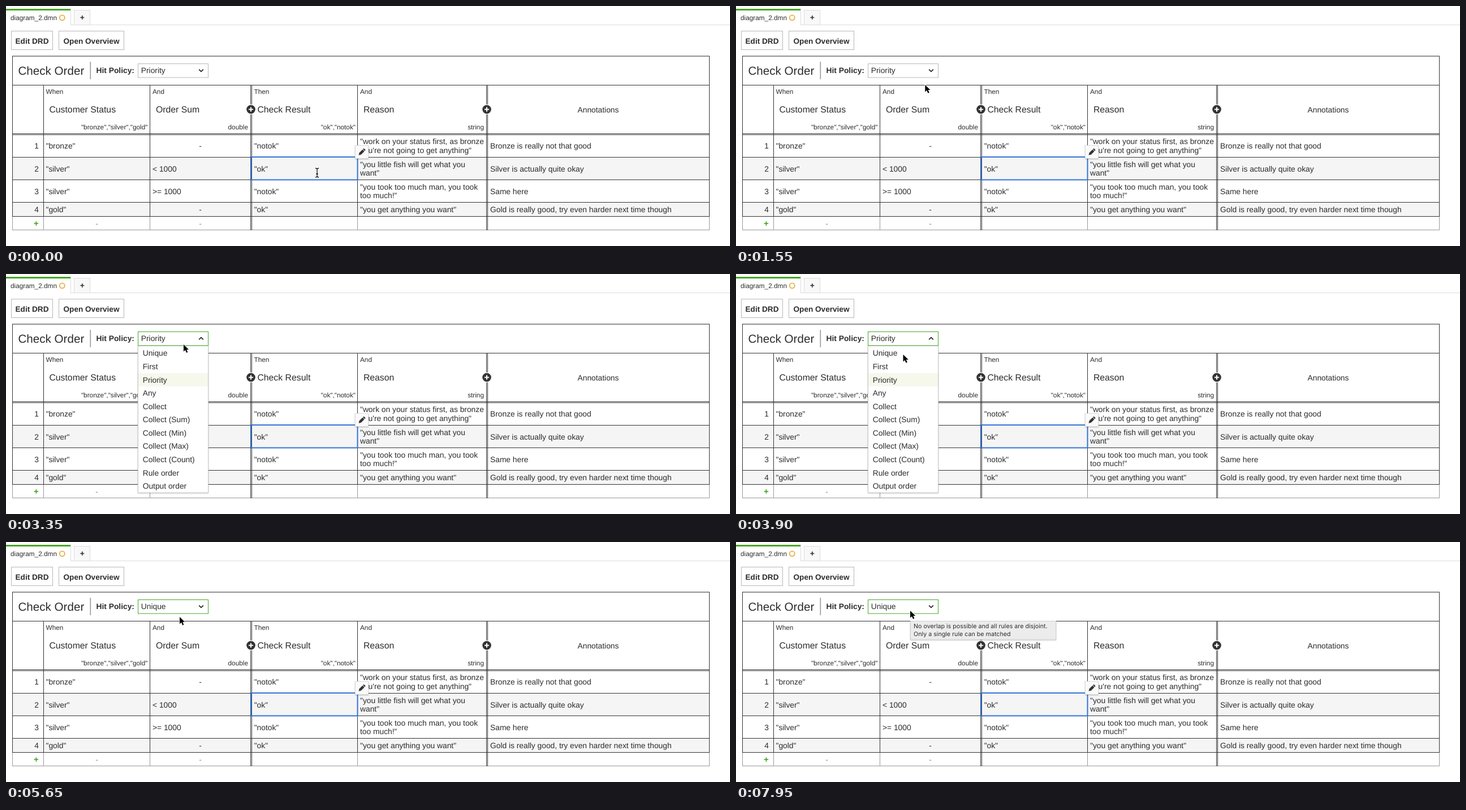
Recreate the animation shown at these times as an HTML page. Size 1280 by 426 pixels, loop 8000 ms.

```html
<!DOCTYPE html>
<html lang="en">
<head>
<meta charset="utf-8">
<title>Decision table</title>
<style>
  html, body { margin: 0; width: 100%; height: 100%; overflow: hidden; background: #fff; }
  svg { display: block; width: 1280px; height: 426px; }
  text { font: 13.8px "Liberation Sans", Arial, sans-serif; fill: #2c2c2c; text-rendering: geometricPrecision; }
  .small { font-size: 11.8px; }
  .name { font-size: 15.8px; }
  .title { font-size: 20.6px; }
  .bold { font-weight: bold; }
  .button { font-weight: bold; font-size: 13.6px; }
  .tip { font: 10.7px Inter, "Open Sans", sans-serif; }
  .faint { fill: #888; }
  .plus { fill: #41a51f; font-weight: bold; font-size: 15px; }
  .end { text-anchor: end; }
  .mid { text-anchor: middle; }
</style>
</head>
<body>
<svg id="stage" viewBox="0 0 1280 426" xmlns="http://www.w3.org/2000/svg"></svg>
<script>
const LOOP = 8000;
const DARK = '#333', GREEN = '#45a824', GREY = '#b8b8b8';

const text = (x, y, s, cls = '') => `<text x="${x}" y="${y}" class="${cls}">${s}</text>`;
const rect = (x, y, w, h, fill, stroke = 'none', extra = '') =>
  `<rect x="${x}" y="${y}" width="${w}" height="${h}" fill="${fill}" stroke="${stroke}" ${extra}/>`;
const path = (d, stroke, extra = '') => `<path d="${d}" fill="none" stroke="${stroke}" ${extra}/>`;
const group = (id, body, extra = '') => `<g id="${id}" ${extra}>${body}</g>`;
const hline = (y, color = DARK) => path(`M11 ${y}H1244`, color);
const vline = (x, y1, y2, color = DARK) => path(`M${x} ${y1}V${y2}`, color);

function toolbar() {
  return path('M114.5 33.5H1280', '#ddd') + rect(0, 5, 114, 3, GREEN) + vline(114.5, 5, 34, '#ddd') +
    text(8, 24.5, 'diagram_2.dmn', 'small') +
    '<circle cx="99.3" cy="20.8" r="4.5" fill="none" stroke="#e3a52c" stroke-width="1.6"/>' +
    rect(120.5, 7.5, 28, 26, '#f8f8f8', '#ddd') + text(134.7, 24.5, '+', 'bold mid') +
    rect(9.5, 44.5, 73, 33, '#fff', GREY) + text(46, 67, 'Edit DRD', 'button mid') +
    rect(93.5, 44.5, 115, 33, '#fff', GREY) + text(151, 67, 'Open Overview', 'button mid');
}

function grid() {
  let s = rect(12, 269, 1231, 39, '#f5f5f6') + rect(12, 349, 1231, 24, '#f5f5f6');
  s += [140.5, 226.5, 228.5, 268.5, 308.5, 348.5, 373.5].map(y => hline(y)).join('');
  s += hline(397.5, '#999') + hline(89, '#222');
  for (const x of [11.5, 66.5, 254.5, 621.5, 1243.5]) {
    const top = x === 11.5 || x === 1243.5 ? 89 : 140;
    s += vline(x, top, 374) + vline(x, 374, 398, '#999');
  }
  return s + [432.5, 434.5, 849.5, 851.5].map(x => vline(x, 140, 398)).join('');
}

function header() {
  const cols = [
    [66, 'When', 'Customer Status', '"bronze","silver","gold"', 250.5],
    [254.5, 'And', 'Order Sum', 'double', 428],
    [434, 'Then', 'Check Result', '"ok","notok"', 618],
    [621.5, 'And', 'Reason', 'string', 845]
  ];
  let s = text(21.5, 121.8, 'Check Order', 'title') + path('M149.3 99V130', '#999', 'stroke-width="1.6"') +
    text(159.5, 119, 'Hit Policy:', 'bold');
  cols.forEach(([x, clause, name, type, right], i) => {
    s += group('clause' + i, text(x + 4.5, 156, clause, 'small')) +
      text(x + 10.4, 188.8, name, 'name') + text(right, 218.7, type, 'small end');
  });
  s += text(1047, 188.5, 'Annotations', 'mid');
  for (const x of [433, 850]) {
    s += `<circle cx="${x}" cy="183.5" r="9" fill="#fff"/><circle cx="${x}" cy="183.5" r="7.8" fill="${DARK}"/>` +
      path(`M${x - 4} 183.5h8M${x} 179.5v8`, '#fff', 'stroke-width="2"');
  }
  let dots = '';
  for (let i = 0; i < 6; i++) dots += rect(262.5 + i % 2 * 5, 146.5 + (i >> 1) * 4.3, 2.7, 2.7, '#888');
  return s + group('handle', dots);
}

function rules() {
  const rows = [
    [253.2, '"bronze"', '-', '"notok"', ['"work on your status first, as bronze', 'you\'re not going to get anything"'], 'Bronze is really not that good'],
    [293.6, '"silver"', '&lt; 1000', '"ok"', ['"you little fish will get what you', 'want"'], 'Silver is actually quite okay'],
    [333.6, '"silver"', '&gt;= 1000', '"notok"', ['"you took too much man, you took', 'too much!"'], 'Same here'],
    [366.3, '"gold"', '-', '"ok"', ['"you get anything you want"'], 'Gold is really good, try even harder next time though']
  ];
  let s = '';
  rows.forEach(([y, status, sum, result, reason, note], i) => {
    s += text(58, y, i + 1, 'end') + text(70.5, y, status) +
      (sum === '-' ? text(343.5, y, sum, 'mid') : text(259, y, sum)) +
      text(438.7, y, result) + text(856, y, note);
    reason.forEach((line, j) => { s += text(626, y + (j - (reason.length - 1) / 2) * 15.7, line); });
  });
  return s + text(53.5, 391, '+', 'plus mid') + text(160.5, 390.5, '-', 'faint mid') + text(343.5, 390.5, '-', 'faint mid');
}

function selection() {
  return rect(433.5, 268, 188, 40.5, 'none', '#3373d8', 'stroke-width="2"') +
    rect(617.5, 247.5, 23, 23, '#fafafa', '#ddd', 'filter="url(#shadow)"') +
    `<g transform="translate(629 259.3) rotate(45)" fill="${DARK}">` +
    '<path d="M-2.3-4.2H2.3V4L0 7.8L-2.3 4Z"/><rect x="-2.3" y="-7.3" width="4.6" height="2.3" rx="1"/></g>';
}

function dropdown() {
  const options = ['Unique', 'First', 'Priority', 'Any', 'Collect', 'Collect (Sum)', 'Collect (Min)',
    'Collect (Max)', 'Collect (Count)', 'Rule order', 'Output order'];
  return rect(233.5, 127.5, 124, 260.5, '#fff', '#ccc', 'filter="url(#shadow)"') +
    rect(234, 176, 123, 23.5, '#f6f8ec') +
    options.map((o, i) => text(241.7, 145.4 + i * 23.58, o)).join('');
}

function tooltip() {
  return rect(308.5, 140.5, 257, 32.5, '#ececec', '#d2d2d2', 'filter="url(#shadow)"') +
    text(314, 153.4, 'No overlap is possible and all rules are disjoint.', 'tip') +
    text(314, 167, 'Only a single rule can be matched', 'tip');
}

function cursors() {
  const beam = 'M-3-8Q0-8 0-6Q0-8 3-8M0-6V6M-3 8Q0 8 0 6Q0 8 3 8M-1.8 2H1.8';
  const arm = 'M-.8 0V-4.6H-3L0-8L3-4.6H.8V0Z';
  const cross = [0, 90, 180, 270].map(a => `<path d="${arm}" transform="rotate(${a})"/>`).join('');
  return group('beam', path(beam, '#fff', 'stroke-width="2.6"') + path(beam, '#111', 'stroke-width="1.3"')) +
    group('move', `<g fill="#fff" stroke="#fff" stroke-width="2">${cross}</g><g fill="#111">${cross}</g>`) +
    group('arrow', '<path d="M0 0V12.6L3 9.9L5.1 14.7L7.4 13.7L5.3 9.1H9.2Z" fill="#000" stroke="#fff" stroke-width="1.6" paint-order="stroke"/>');
}

const stage = document.getElementById('stage');
stage.innerHTML =
  '<defs><filter id="shadow" x="-20%" y="-20%" width="140%" height="150%">' +
  '<feDropShadow dx="0" dy="1" stdDeviation="1.2" flood-color="#000" flood-opacity=".25"/></filter></defs>' +
  toolbar() + grid() + header() + rules() + selection() +
  group('menu', dropdown()) +
  rect(233.5, 102.5, 124, 24.5, '#fff', GREY, 'id="box"') + '<text id="value" x="238.8" y="119"></text>' +
  path('M341.2 112.6L345 116.4L348.8 112.6', '#222', 'id="chevron" stroke-width="1.7"') +
  group('tooltip', tooltip()) + group('cursor', cursors());

const el = id => document.getElementById(id);
const show = (id, on) => { el(id).style.display = on ? '' : 'none'; };

// Pointer track: time, x, y
const track = [
  [0, 550, 296], [400, 550, 296], [600, 534, 285], [800, 484, 252], [900, 448, 229],
  [1000, 404, 199], [1200, 360, 166], [1450, 338, 145], [1750, 327, 130], [1850, 319, 119],
  [2000, 317, 117], [3150, 317, 117], [3350, 314, 125], [3600, 300, 144], [3700, 298, 146],
  [3850, 298, 146], [3900, 295.5, 143], [5000, 295.5, 143], [5650, 307, 133], [5850, 308, 126],
  [6000, 308, 122], [LOOP, 308, 122]
];

function pointer(t) {
  const i = track.findIndex(p => p[0] > t);
  const [t0, x0, y0] = track[i - 1], [t1, x1, y1] = track[i];
  const k = (t - t0) / (t1 - t0);
  return [x0 + (x1 - x0) * k, y0 + (y1 - y0) * k];
}

function draw(t) {
  const [x, y] = pointer(t);
  const open = t >= 2300 && t < 4050;
  const inHeader = !open && y > 140 && y < 228 && x < 433;
  const moving = inHeader && t < 2000;

  show('menu', open);
  show('handle', inHeader);
  show('clause1', !inHeader);
  show('beam', t < 950);
  show('move', t >= 950 && moving);
  show('arrow', t >= 950 && !moving);
  el('cursor').setAttribute('transform', `translate(${x} ${y})`);

  el('box').setAttribute('stroke', t >= 1800 ? GREEN : GREY);
  el('value').textContent = t < 4050 ? 'Priority' : 'Unique';
  el('chevron').setAttribute('transform', open ? 'rotate(180 345 114.5)' : '');
  el('tooltip').setAttribute('opacity', Math.min(1, Math.max(0, (t - 7120) / 250)));
}

const start = performance.now();
function tick() {
  draw((performance.now() - start) % LOOP);
  requestAnimationFrame(tick);
}
tick();
</script>
</body>
</html>
```
